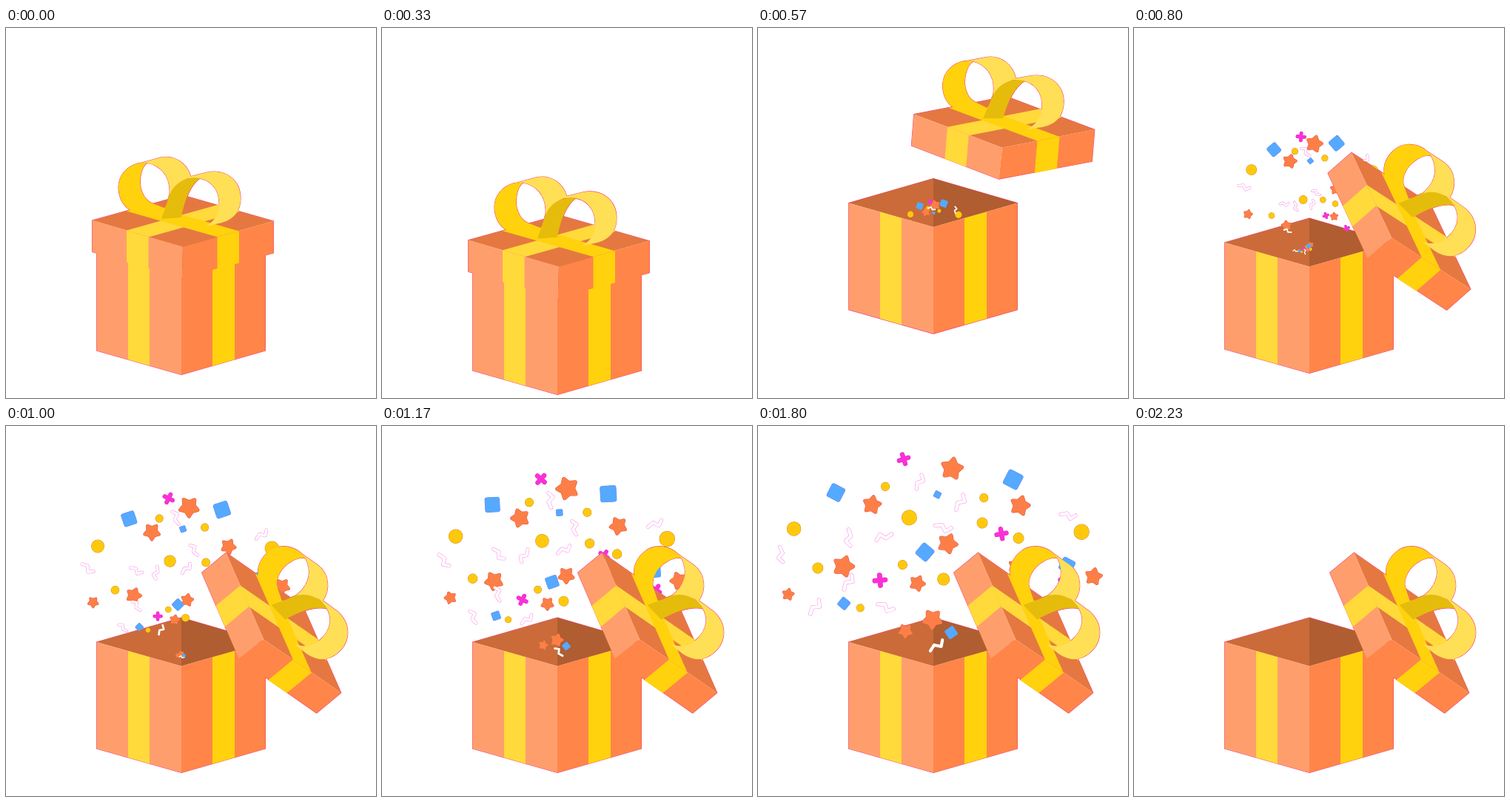
An HTML page with a canvas for the animation above (2.51 s loop, 500 by 500 pixels).

```html
<!DOCTYPE html>
<html lang="en">
<head>
<meta charset="utf-8">
<title>Gift box</title>
<style>
  html, body { margin: 0; width: 100%; height: 100%; overflow: hidden; background: #fff; }
  canvas { display: block; width: 100vw; height: 100vh; }
</style>
</head>
<body>
<canvas id="stage" width="500" height="500"></canvas>
<script>
const LOOP = 2510, STEP = 100 / 3, LAST = 67;
const ctx = document.getElementById('stage').getContext('2d');

const shape = (color, d) => ({ color, path: new Path2D(d) });
const draw = shapes => shapes.forEach(s => {
  ctx.fillStyle = s.color;
  ctx.fill(s.path);
});

const inside = [
  shape('#cb6b39', 'M122.5 292 237 259V324.5Z'),
  shape('#b05d31', 'M237 259 350.5 292 237 324.5Z')
];
const front = [
  shape('#ff9e6d', 'M122.5 292 237 324.5V468.5L122.5 436Z'),
  shape('#ff8548', 'M237 324.5 350.5 292V436L237 468.5Z'),
  shape('#ffda3a', 'M165 304 194 312.3V456.3L165 448Z'),
  shape('#ffd20d', 'M279 312.5 309 304V448L279 456.5Z')
];
const lid = [
  shape('#e57840', 'M116.5 260 239 226 361.5 261 239 295.5Z'),
  shape('#ffda3a', 'M163 273.5 286 239 316 248 193 282.5Z'),
  shape('#ffd20d', 'M286 282.5 315 274.5 192 239.5 163 247.5Z'),
  shape('#ff9e6d', 'M116.5 260 239 295.5 238 338 116.5 302.5Z'),
  shape('#ff8548', 'M239 295.5 361.5 261V304L238 338Z'),
  shape('#ffda3a', 'M163 273.5 192.5 282.2V325L163 316.5Z'),
  shape('#ffd20d', 'M285.5 282.5 315 274.2V317.5L285.5 326Z')
];
const bow = [
  shape('#ffdf55', 'M176 184 209 175C228 171 245 183 250 201L240 206 222 226 213 256 214 244C224 232 224 208 212 194Q204 185 190 182Z'),
  shape('#ffd20d', 'M191 182C181 189 179 210 184 222Q189 234 198 237L216 244 212 258 168 246C157 240 152 227 152 215C152 200 163 187 178 183Z'),
  shape('#ffdf55', 'M240 203 272 195C297 190 317 206 317 230C317 248 308 258 292 263L270 268C284 260 289 248 288 236C288 217 275 204 259 203Z'),
  shape('#e5bc0b', 'M262 203C240 199 222 214 218 235L210 258 237 256C240 240 246 215 262 203Z')
];
const bodyEdge = new Path2D('M122.5 292 237 259 350.5 292V436L237 468.5 122.5 436Z');
const lidEdge = new Path2D('M116.5 260 239 226 361.5 261V304L238 338 116.5 302.5Z');

function starPath() {
  const p = new Path2D();
  for (let i = 0; i < 10; i++) {
    const r = i % 2 ? 0.5 : 0.86, a = i * Math.PI / 5 - Math.PI / 2;
    p.lineTo(r * Math.cos(a), r * Math.sin(a));
  }
  p.closePath();
  return p;
}
const square = new Path2D();
square.roundRect(-1, -1, 2, 2, 0.28);
const disc = new Path2D();
disc.arc(0, 0, 1, 0, 7);

// fill and line share one colour; line is a fraction of the size
const kinds = {
  dot: { color: '#fec90c', rim: '#d8902a', path: disc, fill: true, line: 0 },
  star: { color: '#fd7f47', rim: '#e4523f', path: starPath(), fill: true, line: 0.28, turn: 0.65 },
  square: { color: '#55a9ff', rim: '#6a8af5', path: square, fill: true, line: 0 },
  cross: { color: '#fb31d6', rim: '#e02cc4', path: new Path2D('M-.62-.62.62.62M.62-.62-.62.62'), line: 0.72 },
  curl: { color: '#fff', rim: '#fb86e6', path: new Path2D('M-1 .42-.6-.35.2.1.9-.48'), line: 0.4, turn: 0.3 }
};

// each wave leaves the box at its own time; a piece is [x, y, size] at REF ms
const REF = 1470;
const waves = [
  { start: 430,
    dot: [[185, 85, 6], [292, 100, 6], [66, 140, 10], [420, 144, 11]],
    star: [[256, 62, 17], [169, 109, 14], [58, 228, 9], [437, 204, 13]],
    square: [[328, 75, 11.5], [123, 92, 10.5], [241, 97, 4.5], [400, 189, 9.5]],
    cross: [[206, 49, 8]],
    curl: [[222, 80], [401, 121], [49, 174]] },
  { start: 590,
    dot: [[209, 130, 10], [295, 136, 7], [341, 155, 7], [93, 194, 7]],
    star: [[343, 112, 14], [337, 192, 10]],
    curl: [[267, 110], [248, 142], [135, 154], [179, 155]] },
  { start: 650,
    star: [[126, 193, 15]],
    cross: [[320, 151, 7.5], [404, 209, 8]],
    curl: [[131, 214]] },
  { start: 750,
    dot: [[200, 195, 6], [249, 214, 8], [147, 249, 5]],
    star: [[254, 169, 14], [218, 219, 11]],
    square: [[227, 180, 9.5], [126, 243, 6.5]],
    cross: [[172, 214, 8]],
    curl: [[87, 247], [179, 247]] },
  { start: 950,
    star: [[236, 269, 14], [204, 282, 10]],
    square: [[258, 284, 7]],
    curl: [[240, 299]] }
];

const clamp = v => Math.min(1, Math.max(0, v));
const span = (t, a, b) => clamp((t - a) / (b - a));
const wave = u => (1 - Math.cos(Math.PI * u)) / 2;
const out = (u, p) => 1 - (1 - u) ** p;

// crouch, leap, land
function leap(t, low, high, end) {
  if (t < 330) return low * wave(t / 330);
  if (t < 500) return low + (high - low) * wave((t - 330) / 170);
  return high + (end - high) * wave(span(t, 500, 840));
}

function confettiAt(t) {
  const list = [];
  for (const { start, ...groups } of waves) {
    if (t <= start) continue;
    const end = 1840 + 0.4 * (start - 440);
    const u = span(t, start, end), ref = span(REF, start, end);
    const part = p => out(u, p) / out(ref, p);
    const scale = Math.min(1, 0.2 + 0.8 * part(3)) * (1 - span(t, end - 120, end + 180) ** 2);
    if (scale <= 0) continue;
    const ox = 237, oy = 296 + start * 0.02;
    const spin = 1.87 * part(1.8);
    for (const name in groups) {
      const kind = kinds[name];
      groups[name].forEach(([x, y, size = 10.5], i) => {
        // wide and late throws lose speed sooner
        const reach = Math.abs(x - ox) / 200;
        list.push({
          kind,
          x: ox + (x - ox) * part(0.9 + reach + (start - 430) / 250),
          y: oy + (y - oy) * part(2.9 + reach),
          size: size * scale,
          angle: spin + (kind.turn || 0) + (name === 'curl' ? i * 1.3 : 0)
        });
      });
    }
  }
  return list;
}

function drawPiece({ kind, x, y, size, angle }, color, grow = 0) {
  ctx.save();
  ctx.translate(x, y);
  ctx.rotate(angle);
  ctx.scale(size, size);
  ctx.fillStyle = ctx.strokeStyle = color;
  if (kind.fill) ctx.fill(kind.path);
  const line = kind.line + grow / size;
  if (line) {
    ctx.lineWidth = line;
    ctx.stroke(kind.path);
  }
  ctx.restore();
}

function withPose(x, y, angle, paint) {
  ctx.save();
  ctx.translate(239 + x, 278 + y);
  ctx.rotate(angle * Math.PI / 180);
  ctx.translate(-239, -278);
  paint();
  ctx.restore();
}

function edge(path) {
  ctx.lineWidth = 1.1;
  ctx.strokeStyle = '#f2407a';
  ctx.stroke(path);
}

function render(t) {
  const boxY = leap(t, 27, -61, 0);
  const pose = [
    122.6 * out(span(t, 350, 840), 2.4),
    leap(t, 27, -147, -1),
    50.4 * wave(span(t, 500, 840))
  ];
  const pieces = confettiAt(t);
  const inBox = paint => {
    ctx.save();
    ctx.translate(0, boxY);
    paint();
    ctx.restore();
  };

  ctx.fillStyle = '#fff';
  ctx.fillRect(0, 0, 500, 500);
  ctx.lineCap = ctx.lineJoin = 'round';

  // thin rims show only against the white stage
  pieces.forEach(p => drawPiece(p, p.kind.rim, 1));
  inBox(() => edge(bodyEdge));
  withPose(...pose, () => {
    edge(lidEdge);
    bow.forEach(s => edge(s.path));
  });

  inBox(() => draw(inside));
  pieces.forEach(p => drawPiece(p, p.kind.color));
  inBox(() => draw(front));
  withPose(...pose, () => {
    draw(lid);
    draw(bow);
  });
}

function tick() {
  const t = Math.floor(performance.now() % LOOP / 10) * 10;
  render(Math.min(LAST, Math.floor((t + 4) / STEP)) * STEP);
  requestAnimationFrame(tick);
}
tick();
</script>
</body>
</html>
```
